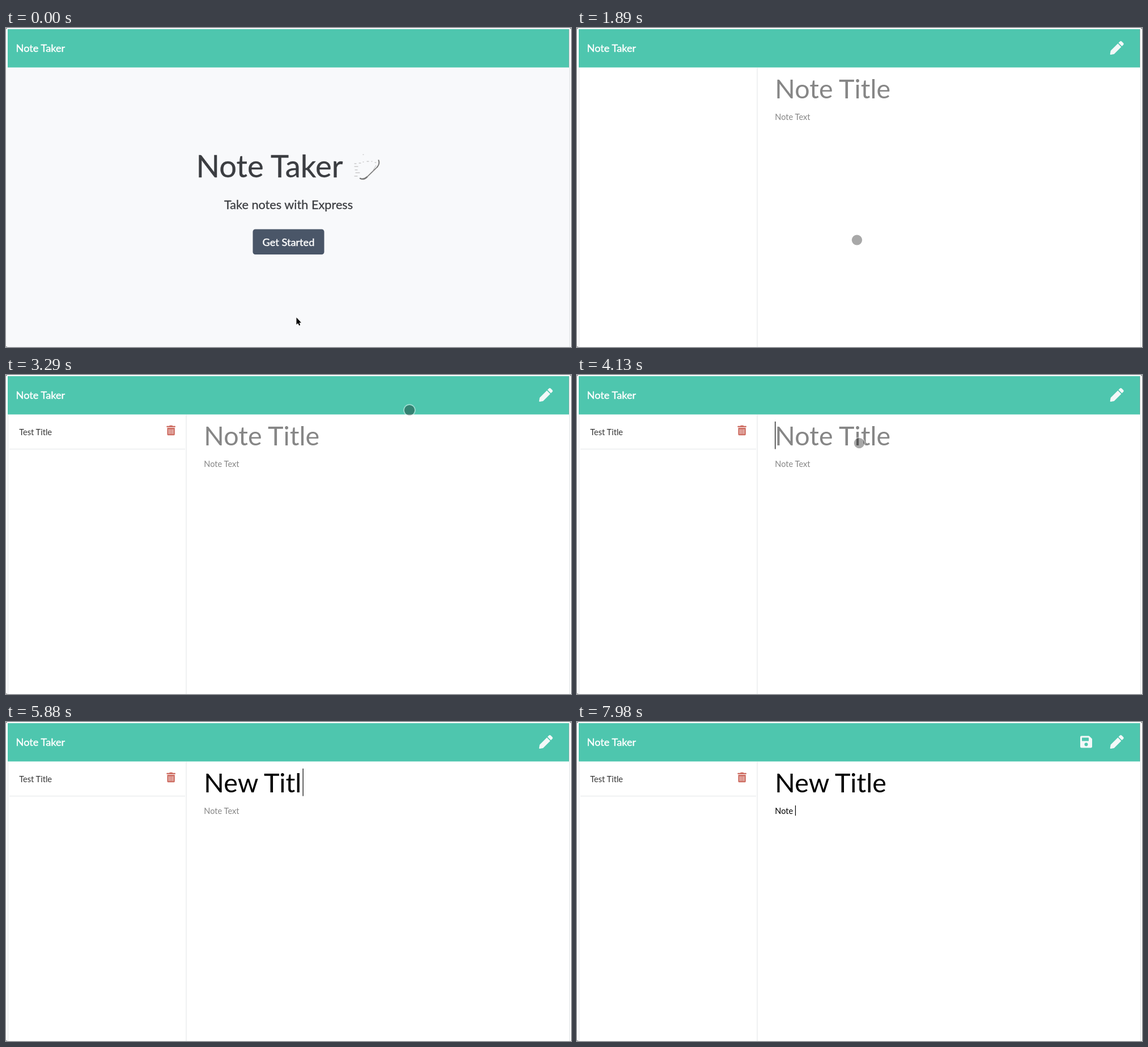
An HTML page for the animation above (8000 ms loop, 997 by 562 pixels).

```html
<!DOCTYPE html>
<html lang="en">
<head>
<meta charset="utf-8">
<title>Note Taker</title>
<style>
  html, body { margin: 0; width: 100%; height: 100%; overflow: hidden; background: #fff; }
  svg { display: block; width: 997px; height: 562px; }
  text { font-family: Lato, sans-serif; white-space: pre; }
  .bright { fill: #fff; stroke: #fff; stroke-width: .45; font-size: 18.2px; }
  .icon { fill: #f3f8f8; }
  .ink { fill: #3b3d41; stroke: #3b3d41; stroke-width: .3; }
  .big { font-size: 46.7px; }
  .small { font-size: 14.6px; }
</style>
</head>
<body>
<svg viewBox="0 0 997 562">
  <rect id="back" width="997" height="562"/>
  <path d="M0 .5H2M.5 0V2M995 .5H997M996.5 0V2M0 561.5H2" stroke="#999"/>
  <path d="M994.5 70V562" stroke="#dfe2e4"/>
  <rect x="3" y="2" width="991" height="67.500" fill="#4ec6ae"/>
  <path d="M993.500 2V69" stroke="#9cb8b4"/>
  <text class="bright" x="17.600" y="42.300">Note Taker</text>

  <g id="home">
    <text class="ink" x="335.500" y="263" font-size="54.400">Note Taker</text>
    <g fill="none" stroke="#777" stroke-linecap="round">
      <path d="M625 265Q631 268 637 262.500" stroke-width="2.400"/>
      <path d="M637 262.500L655 245" stroke-width="1.700"/>
      <path d="M655 245Q660 239 657.500 233" stroke-width="2"/>
      <path d="M647 252L653 242" stroke="#bbb"/>
      <path d="M615 239H618M615 244H621M616 250H620M617 255H624M615 261H620M623 238H626M630 236H631M637 235H640M645 235H646M651 237H653M630 223H631" stroke="#aaa" stroke-width=".9"/>
    </g>
    <text class="ink" x="498.500" y="318.500" font-size="21.700" text-anchor="middle">Take notes with Express</text>
    <rect x="435.500" y="354.500" width="126" height="44.500" rx="4.500" fill="#4a5668"/>
    <text class="bright" x="498.500" y="383.500" text-anchor="middle">Get Started</text>
  </g>

  <g id="notes">
    <path d="M3.500 70V562M318 70V562" stroke="#e2e4e6"/>
    <path class="icon" transform="translate(940.700 23) scale(.0469)" d="M497.900 142.100l-46.100 46.100c-4.700 4.700-12.300 4.700-17 0l-111-111c-4.700-4.700-4.700-12.300 0-17l46.100-46.100c18.700-18.700 49.100-18.700 67.900 0l60.100 60.100c18.800 18.700 18.800 49.100 0 67.900zM284.200 99.800L21.600 362.400.4 483.900c-2.900 16.400 11.400 30.600 27.800 27.800l121.500-21.300 262.600-262.600c4.700-4.700 4.700-12.300 0-17l-111-111c-4.800-4.700-12.400-4.700-17.100 0z"/>
    <path id="save" class="icon" transform="translate(888 23) scale(.0469)" fill-rule="evenodd" d="M434 130L350 46A48 48 0 0 0 316 32H48A48 48 0 0 0 0 80V432A48 48 0 0 0 48 480H400A48 48 0 0 0 448 432V164A48 48 0 0 0 434 130zM224 416a64 64 0 1 1 0-128a64 64 0 0 1 0 128zM320 111V212a12 12 0 0 1-12 12H76a12 12 0 0 1-12-12V108a12 12 0 0 1 12-12H305z"/>
    <g id="list">
      <text class="small" x="23.200" y="105.500" fill="#333">Test Title</text>
      <path d="M6 130.500H316" stroke="#e4e6e8"/>
      <path fill="#cd6b60" transform="translate(283.400 88.700) scale(.0345)" d="M32 464a48 48 0 0 0 48 48h288a48 48 0 0 0 48-48V128H32zm272-256a16 16 0 0 1 32 0v224a16 16 0 0 1-32 0zm-96 0a16 16 0 0 1 32 0v224a16 16 0 0 1-32 0zm-96 0a16 16 0 0 1 32 0v224a16 16 0 0 1-32 0zM432 32H312l-9-19A24 24 0 0 0 281 0H167a24 24 0 0 0-22 13L136 32H16A16 16 0 0 0 0 48v32a16 16 0 0 0 16 16h416a16 16 0 0 0 16-16V48a16 16 0 0 0-16-16z"/>
    </g>
    <text id="title" class="big" x="349.300" y="124"></text>
    <text id="body" class="small" x="349.300" y="161.500"></text>
    <rect id="caret" width="1.200"/>
  </g>

  <path id="arrow" d="M512.500 510V522.500L515.300 519.900L517.200 524.200L519.200 523.300L517.400 519.200H521Z" stroke="#fff" stroke-width="1" paint-order="stroke"/>
  <g id="touch">
    <circle r="9.300" fill="#000" fill-opacity=".34"/>
    <circle r="9.900" fill="none" stroke="#fff" stroke-opacity=".45" stroke-width="1.700"/>
  </g>
</svg>
<script>
const $ = id => document.getElementById(id);
const LOOP = 8000, STEP = 70;
const OPEN = 1540, LISTED = 2520, FOCUS = 4060, TAB = 6230;

// pointer stops: time, x, y
const path = [
  [0, 512.5, 511], [420, 505, 448], [770, 495, 380], [910, 494, 373.5],
  [1890, 494, 373.5], [2380, 366, 174], [2730, 221, 102], [2870, 152, 102],
  [2940, 152, 102], [3290, 712, 62], [3500, 930, 40], [3780, 583, 110],
  [3920, 515, 130], [4130, 498, 120]
];

const title = {
  el: $('title'), hint: 'Note Title', text: 'New Title', size: 46.7, top: 82, height: 48.5,
  keys: [4690, 4830, 5040, 5180, 5390, 5530, 5670, 5810, 5950]
};
const body = {
  el: $('body'), hint: 'Note Text', text: 'Note ', size: 14.6, top: 147, height: 18,
  keys: [6790, 6930, 7070, 7210, 7980]
};
const pen = document.createElement('canvas').getContext('2d');

function pointAt(t) {
  const i = path.findIndex(p => p[0] > t);
  if (i < 0) return path[path.length - 1].slice(1);
  const [t0, x0, y0] = path[i - 1], [t1, x1, y1] = path[i];
  const k = (t - t0) / (t1 - t0);
  return [x0 + (x1 - x0) * k, y0 + (y1 - y0) * k];
}

function show(id, on) {
  $(id).style.display = on ? '' : 'none';
}

function fillField(field, t) {
  const typed = field.text.slice(0, field.keys.filter(k => k <= t).length);
  field.el.textContent = typed || field.hint;
  field.el.setAttribute('fill', typed ? '#000' : '#868686');
  return typed;
}

function placeCaret(field, typed) {
  pen.font = `${field.size}px Lato, sans-serif`;
  const caret = $('caret');
  caret.setAttribute('x', 349.2 + pen.measureText(typed).width);
  caret.setAttribute('y', field.top);
  caret.setAttribute('height', field.height);
}

function draw(time) {
  const t = Math.floor(time / STEP) * STEP;
  const opened = t >= OPEN;
  $('back').setAttribute('fill', opened ? '#fff' : '#f8f9fb');
  show('home', !opened);
  show('notes', opened);
  show('list', t >= LISTED);
  show('save', t >= body.keys[0]);

  const typedTitle = fillField(title, t), typedBody = fillField(body, t);
  if (t < TAB) placeCaret(title, typedTitle);
  else placeCaret(body, typedBody);
  show('caret', t >= FOCUS && !(t >= 7630 && t < 7980));

  show('arrow', t < STEP);
  show('touch', t >= STEP && t < title.keys[0]);
  $('touch').setAttribute('transform', `translate(${pointAt(t)})`);
}

function tick() {
  draw(performance.now() % LOOP);
  requestAnimationFrame(tick);
}
tick();
</script>
</body>
</html>
```
